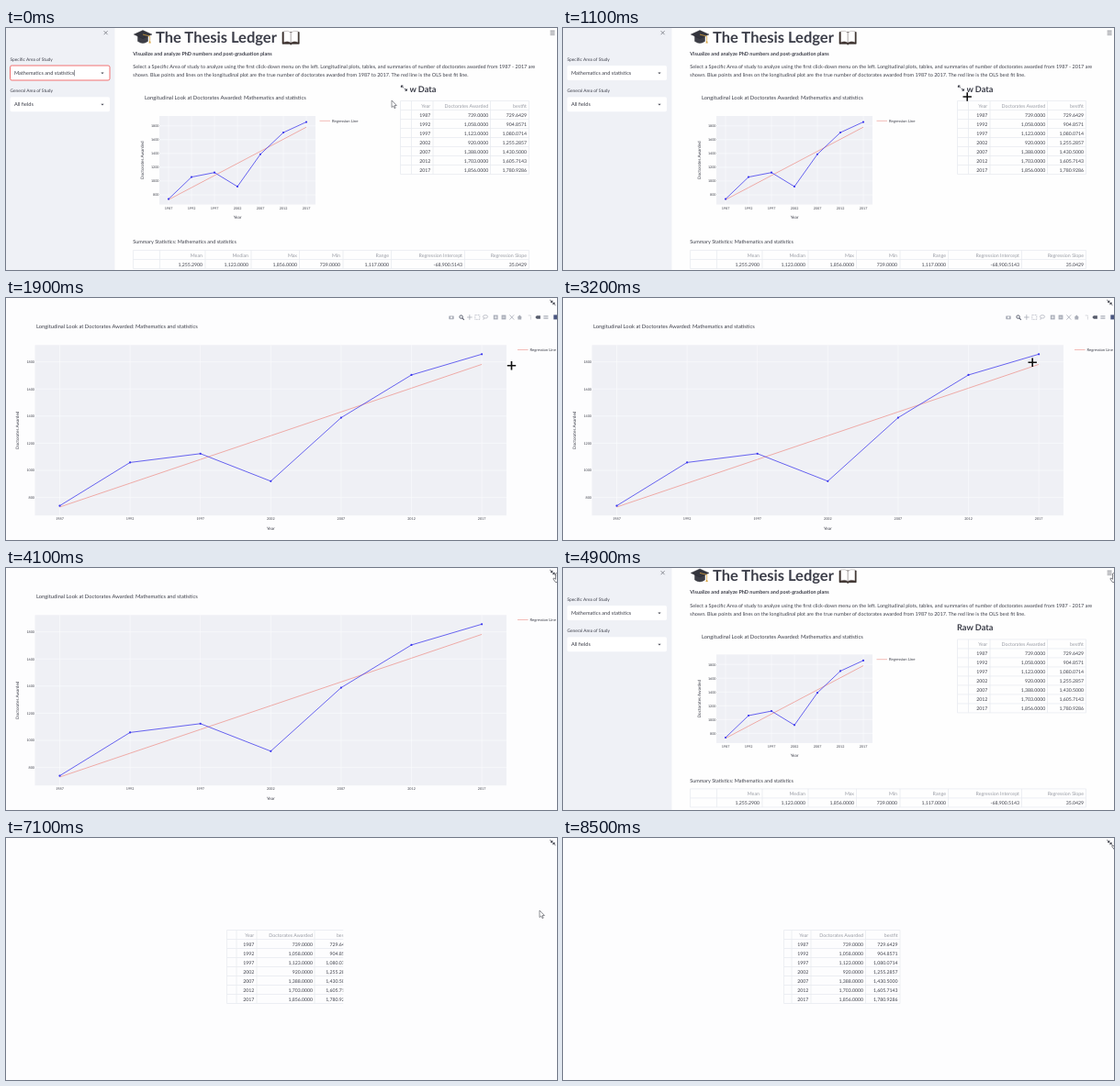
An HTML page for the animation above (9.1 s loop, 600 px wide and 264 px high).

```html
<!DOCTYPE html>
<html lang="en">
<head>
<meta charset="utf-8">
<title>Doctorates awarded</title>
<style>
html, body { margin: 0; width: 100%; height: 100%; overflow: hidden; background: #fefefe; }
svg { display: block; width: 100vw; height: 100vh; }
text { font-family: Lato, "Open Sans", sans-serif; fill: #3c3e49; text-rendering: geometricPrecision; white-space: pre; }
</style>
</head>
<body>
<svg id="stage" viewBox="0 0 600 264"></svg>
<script>
const LOOP = 9100, STEP = 100;
const years = [1987, 1992, 1997, 2002, 2007, 2012, 2017];
const awarded = [739, 1058, 1123, 920, 1388, 1703, 1856];
const fit = [729.6429, 904.8571, 1080.0714, 1255.2857, 1430.5, 1605.7143, 1780.9286];
const FIELD = 'Mathematics and statistics';

const num = v => v.toLocaleString('en-US', { minimumFractionDigits: 4, maximumFractionDigits: 4 });
const text = (x, y, size, str, attrs = '') =>
  `<text x="${x}" y="${y}" font-size="${size}" ${attrs}>${str}</text>`;
const rect = (x, y, w, h, fill, attrs = '') =>
  `<rect x="${x}" y="${y}" width="${w}" height="${h}" fill="${fill}" ${attrs}/>`;
const path = (d, stroke, width = 0.7, fill = 'none', attrs = '') =>
  `<path d="${d}" stroke="${stroke}" stroke-width="${width}" fill="${fill}" ${attrs}/>`;
const group = (id, body, attrs = '') => `<g id="${id}" ${attrs}>${body}</g>`;
const END = 'text-anchor="end"', MID = 'text-anchor="middle"', BOLD = 'font-weight="700"';

// cols: x of the column lines; right: right edge of each text column
function table(top, cols, right, rows) {
  const h = 10, x0 = cols[0], x1 = cols[cols.length - 1], bottom = top + h * rows.length;
  let d = '';
  for (const x of cols) d += `M${x} ${top}V${bottom}`;
  for (let y = top; y <= bottom; y += h) d += `M${x0} ${y}H${x1}`;
  let out = path(d, '#e9ebf0', 0.8);
  rows.forEach((row, r) => row.forEach((cell, c) => {
    const size = r ? 5.2 : 5.3;
    out += text(right[c], top + 7.4 + r * h, size, cell, END + (r ? '' : ' style="fill:#999ca5"'));
  }));
  return out;
}

const rawRows = [['Year', 'Doctorates Awarded', 'bestfit'],
  ...years.map((y, i) => [y, num(awarded[i]), num(fit[i])])];

function chart(o) {
  const X = i => o.x0 + o.dx * i;
  const Y = v => o.y800 - (v - 800) / 200 * o.dy;
  const ticks = [800, 1000, 1200, 1400, 1600, 1800];
  const line = vals => 'M' + vals.map((v, i) => `${X(i).toFixed(2)} ${Y(v).toFixed(2)}`).join('L');
  let out = rect(o.left, o.top, o.w, o.h, '#eff0f5');
  let grid = '';
  years.forEach((y, i) => {
    grid += `M${X(i)} ${o.top}v${o.h}`;
    out += text(X(i), o.top + o.h + 5, 3.7, y, MID);
  });
  ticks.forEach(v => {
    grid += `M${o.left} ${Y(v)}h${o.w}`;
    out += text(o.left - 0.5, Y(v) + 1.4, 3.7, v, END);
  });
  out += path(grid, '#fafbfd', 0.6);
  out += path(line(fit), '#ee938c', 0.75) + path(line(awarded), '#4d49ee', 0.85);
  awarded.forEach((v, i) => {
    out += `<circle cx="${X(i)}" cy="${Y(v)}" r="1.1" fill="#3a36ee"/>`;
  });
  const mx = X(3), my = o.top + o.h / 2;
  out += text(mx, o.top + o.h + 15.4, 4.6, 'Year', MID);
  out += text(0, 0, 4.6, 'Doctorates Awarded', `${MID} transform="translate(${o.axis} ${my}) rotate(-90)"`);
  out += text(o.tx, o.ty, 5.8, `Longitudinal Look at Doctorates Awarded: ${FIELD}`);
  out += path(`M${o.lx} ${o.ly}h11.5`, '#f0a09a', 0.7);
  return out + text(o.lx + 13.5, o.ly + 1.5, 4.15, 'Regression Line');
}

const expand = (x, y) => path('M-.6-.5L-3-2.5M-3-.7V-2.6H-1M.6.5L3 2.5M3 .7V2.6H1', '#2b2d38', 0.95,
  'none', `transform="translate(${x} ${y})"`);
const collapse = path('M-3-2.8L-.5-.5M-.5-2.3V-.4H-2.4M3 2.8L.5.5M.5 2.3V.4H2.4', '#2b2d38', 0.9,
  'none', 'transform="translate(595.4 5)"');

function select(y, label, value) {
  return text(4.5, y - 5.2, 4.85, label) + rect(4.5, y, 108.5, 16, '#fff', 'rx="1.8"')
    + text(9, y + 10, 5.6, value)
    + `<path d="M103.4 ${y + 7.4}h3.2l-1.6 1.8z" fill="#444651"/>`;
}

function cap() {
  return path('M143.5 8V14.5Q149 18.6 154.5 14.5V8Z', '#25262c', 0.4, '#3d3e47')
    + path('M139.2 7L149 2.6 159 7 149 11.6Z', '#222329', 0.4, '#34353d')
    + path('M149 7L156.6 9V13.5', '#d9a441', 0.8)
    + path('M156.6 12.8L157.8 16.6H155.4Z', 'none', 0, '#d9a441');
}

function book() {
  return path('M301 4.5H319.2V17.3H311.6L310.2 18.2 308.8 17.3H301Z', '#2d2523', 0.6, '#3c302c')
    + path('M302.6 3.6Q307.5 2.4 310.2 5V16Q307 14 302.6 15.4ZM317.9 3.6Q313 2.4 310.2 5V16Q313.5 14 317.9 15.4Z',
      '#8a8180', 0.4, '#fff');
}

function sidebar() {
  return rect(0, 0, 118.5, 264, '#eff1f6') + path('M106.6 3.2l4 4m0-4l-4 4', '#70737c', 0.8)
    + select(41, 'Specific Area of Study', FIELD) + select(75.3, 'General Area of Study', 'All fields')
    + rect(4.5, 41, 108.5, 16, 'none', 'id="focus" rx="1.8" stroke="#f0504f" stroke-width="0.8"')
    + rect(74, 45.8, 0.5, 6.6, '#31333f', 'id="caret"');
}

function content() {
  let out = cap() + book() + text(163, 15.6, 16.5, 'The Thesis Ledger', BOLD);
  out += text(138.3, 29.8, 5.5, 'Visualize and analyze PhD numbers and post-graduation plans', BOLD);
  out += text(138.3, 44.2, 5.5, 'Select a Specific Area of study to analyze using the first click-down menu on the left. '
    + 'Longitudinal plots, tables, and summaries of number of doctorates awarded from 1987 - 2017 are');
  out += text(138.3, 53.4, 5.5, 'shown. Blue points and lines on the longitudinal plot are the true number of doctorates '
    + 'awarded from 1987 to 2017. The red line is the OLS best fit line.');
  out += chart({ left: 167, top: 96, w: 170, h: 96.5, x0: 177, dx: 25, y800: 182, dy: 15.05,
    axis: 150, tx: 151, ty: 78.4, lx: 341.5, ly: 101.3 });
  out += text(429, 70, 9.2, 'Raw Data', BOLD);
  out += table(79.5, [429.5, 441.5, 465, 527.5, 569.5], [462.3, 525.3, 567], rawRows);
  out += text(138.3, 235.4, 5.5, `Summary Statistics: ${FIELD}`);
  out += table(242.5, [138.5, 167.5, 217, 267, 319.5, 367, 419.5, 499.5, 569.5],
    [214, 264, 317, 364, 417, 497, 567], [
      ['Mean', 'Median', 'Max', 'Min', 'Range', 'Regression Intercept', 'Regression Slope'],
      [1255.29, 1123, 1856, 739, 1117, -68900.5143, 35.0429].map(num)]);
  return out + group('chartBtn', rect(428, 60, 11.7, 13, '#fefefe') + expand(433.4, 65.6));
}

const dashboard = rect(0, 0, 600, 264, '#fefefe') + group('main', content()) + sidebar()
  + path('M592.6 3.2h5M592.6 5.2h5M592.6 7.2h5', '#6c6f78', 0.8)
  + group('tableBtn', expand(579, 81.6));

function modebar() {
  const grey = '#a9adb8', dark = '#565b6b', y = 21;
  const box = (x, sign) => rect(x - 2.4, y - 2.4, 4.8, 4.8, grey) + path(`M${x - 1.4} ${y}h2.8${sign}`, '#fff', 0.7);
  return rect(482.3, 19.4, 5.4, 3.8, grey, 'rx=".6"') + `<circle cx="485" cy="21.3" r="1.1" fill="#fff"/>`
    + `<circle cx="495.6" cy="20.6" r="1.7" fill="none" stroke="${dark}" stroke-width="1"/>`
    + path('M496.8 21.8l2 2', dark, 1.1)
    + path(`M502 ${y}h5.6M504.8 18.2v5.6`, grey, 0.8)
    + path('M510.8 18.6h5v4.8h-5z', grey, 0.7, 'none', 'stroke-dasharray="1 .6"')
    + `<ellipse cx="522" cy="20.4" rx="2.6" ry="1.7" fill="none" stroke="${grey}" stroke-width=".7"/>`
    + path('M520.4 21.8l-.6 2', grey, 0.7)
    + box(533.2, 'm-1.4-1.4v2.8') + box(542, '')
    + path('M548.4 18.4l4.8 5.2m0-5.2l-4.8 5.2', grey, 0.8)
    + path('M556.6 21.2l2.7-2.7 2.7 2.7h-.8v2.2h-3.8v-2.2z', 'none', 0, grey)
    + path('M568.8 19h2.6v4.6', grey, 0.6, 'none', 'stroke-dasharray="1 .5"')
    + path('M576.4 21l1.5-1.8h4v3.6h-4z', 'none', 0, dark)
    + path('M585.4 19.8h5M585.4 22.2h5', grey, 1.2)
    + rect(596.3, 18.4, 5, 5, '#4a5680');
}

const page = (id, body) => group(id, rect(0, 0, 600, 264, '#fdfdfe') + body);
const wide = chart({ left: 31.5, top: 51.3, w: 513.5, h: 186, x0: 58.5, dx: 76.6, y800: 217.6, dy: 29.6,
  axis: 13.6, tx: 33, ty: 33, lx: 557, ly: 56.5 });

const cursors = {
  arrow: path('M0 0V7.6L1.8 6 3 8.7 4.2 8.1 3 5.5H5.4Z', '#55575f', 0.65, '#fff'),
  cross: path('M-4.7 0H4.7M0-4.7V4.7', '#111', 1.6),
  hand: path('M-.9.6Q0-.6.9.6V4L4 4.8Q4.9 5.2 4.7 6.5L3.8 10H-1L-3.6 6.5Q-3.5 5.2-2.3 5.7L-.9 6.8Z',
    '#44464e', 0.7, '#fff')
};

document.getElementById('stage').innerHTML = group('home', dashboard)
  + page('bigChart', wide + group('bar', modebar()) + collapse)
  + '<clipPath id="crop"><rect x="239" y="99" width="128.2" height="84"/></clipPath>'
  + page('bigTable',
    group('early', table(100.5, [240.5, 251, 273, 336, 377], [270.3, 334, 374.8], rawRows), 'clip-path="url(#crop)"')
    + group('settled', table(100.5, [240.5, 249, 270, 329.5, 367], [267.3, 327, 364.6], rawRows))
    + collapse)
  + group('cursor', Object.entries(cursors).map(([k, v]) => group(k, v)).join(''));

// time, x, y, shape from then on
const track = [
  [0, 420, 79, 'arrow'], [300, 430, 74, 'arrow'], [400, 434, 71, 'hand'], [500, 436.5, 69.5, 'hand'],
  [1000, 436.5, 69.5, 'hand'], [1100, 440.2, 75, 'cross'], [1500, 440.2, 75, 'cross'],
  [1900, 550.5, 73.7, 'cross'], [2000, 586, 92, 'cross'], [2150, 470, 162, 'cross'],
  [2300, 258, 180, 'cross'], [2500, 468, 100, 'cross'], [2800, 468, 103.5, 'cross'],
  [2900, 468, 103.5, 'cross'], [3400, 540, 48, 'arrow'], [3800, 597, 9, 'hand'],
  [3900, 599.5, 5.5, 'hand'], [5200, 599.5, 5.5, 'arrow'], [5600, 580, 55, 'arrow'],
  [5900, 578, 93, 'arrow'], [6000, 582, 82, 'hand'], [6100, 584.5, 76.2, 'hand'],
  [6200, 584.5, 76.2, 'hand'], [6600, 582.5, 78.4, 'hand'], [7000, 582.5, 78.4, 'hand'],
  [7100, 581, 79, 'arrow'], [7500, 581, 79, 'arrow'], [7900, 569, 62, 'arrow'],
  [8300, 592, 16, 'arrow'], [8400, 598, 8, 'hand'], [8500, 601.3, 2.6, 'hand'], [LOOP, 601.3, 2.6, 'hand']
];

const $ = id => document.getElementById(id);
const show = (id, on) => { $(id).style.display = on ? '' : 'none'; };
const ramp = (t, a, b) => Math.min(1, Math.max(0, (t - a) / (b - a)));

function draw(t) {
  const chartOn = t >= 1200 && t < 4800, tableOn = t >= 7100;
  show('home', !chartOn && !tableOn);
  show('bigChart', chartOn);
  show('bigTable', tableOn);
  show('early', t < 7200);
  show('settled', t >= 7200);
  show('caret', t < 500);
  show('chartBtn', t < 1200);
  show('tableBtn', t >= 5800);
  // the page sits slightly scrolled after leaving the large chart
  $('main').setAttribute('transform', `translate(0 ${t < 4800 ? 0 : -1.6})`);
  $('focus').style.opacity = 1 - ramp(t, 600, 900);
  $('bar').style.opacity = ramp(t, 1200, 1400) * (1 - ramp(t, 3900, 4100));

  let i = 0;
  while (i < track.length - 2 && track[i + 1][0] <= t) i++;
  const [t0, x0, y0, shape] = track[i], [t1, x1, y1] = track[i + 1];
  const k = ramp(t, t0, t1);
  $('cursor').setAttribute('transform', `translate(${x0 + (x1 - x0) * k} ${y0 + (y1 - y0) * k})`);
  for (const name in cursors) show(name, name === shape);
}

const start = performance.now();
function tick() {
  const t = (performance.now() - start) % LOOP;
  draw(Math.floor(t / STEP) * STEP);
  requestAnimationFrame(tick);
}
tick();
</script>
</body>
</html>
```
